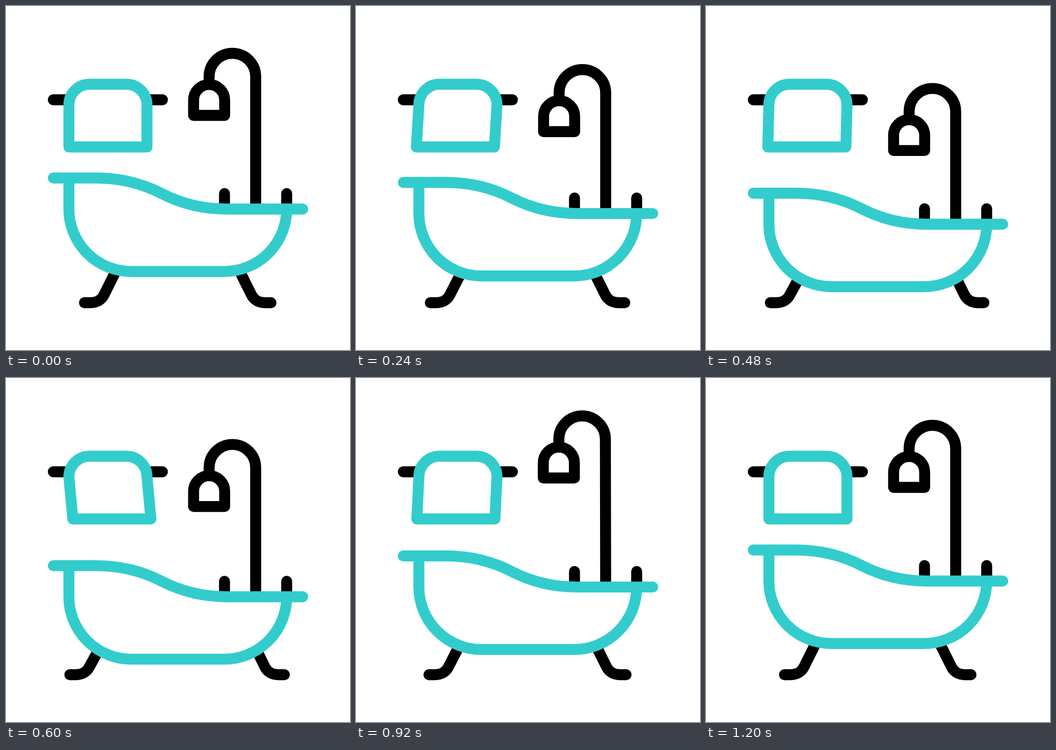
Write an HTML page with a canvas that moves like this. It is 640 px wide and 640 px high and loops after 1320 ms.

```html
<!DOCTYPE html>
<html lang="en">
<head>
<meta charset="utf-8">
<title>Bathtub</title>
<style>
  html, body { margin: 0; width: 100%; height: 100%; overflow: hidden; background: #fff; }
  canvas { display: block; width: 100vw; height: 100vh; }
</style>
</head>
<body>
<canvas id="stage" width="640" height="640"></canvas>
<script>
const ctx = document.getElementById('stage').getContext('2d');
const LOOP = 1320, STEP = 40;
const TEAL = '#33cccc', BLACK = '#000';

// [time in ms, value]
const TUB = [[40, 0], [560, 29.3], [1200, 0]];
const SHOWER = [[71, 0], [428, 67.6], [828, -20.5], [1144, 0]];
const TOWEL = [[84, 0], [360, -7.6], [640, 7.8], [988, -4.6], [1200, 0]];

// cubic-bezier(.5, 0, .5, 1)
function ease(x) {
  let lo = 0, hi = 1;
  for (let i = 0; i < 24; i++) {
    const u = (lo + hi) / 2;
    if (1.5 * u * (1 - u) + u * u * u < x) lo = u; else hi = u;
  }
  return lo * lo * (3 - 2 * lo);
}

function track(keys, t) {
  if (t <= keys[0][0]) return keys[0][1];
  for (let i = 1; i < keys.length; i++) {
    const [t0, a] = keys[i - 1], [t1, b] = keys[i];
    if (t < t1) return a + (b - a) * ease((t - t0) / (t1 - t0));
  }
  return keys[keys.length - 1][1];
}

function stroke(color, cap, build, fill) {
  ctx.beginPath();
  build(ctx);
  if (fill) {
    ctx.fillStyle = fill;
    ctx.fill();
  }
  ctx.strokeStyle = color;
  ctx.lineCap = cap;
  ctx.stroke();
}

function line(color, x0, y0, x1, y1) {
  stroke(color, 'round', c => { c.moveTo(x0, y0); c.lineTo(x1, y1); });
}

// side: 1 for left, -1 for right
function leg(side, foot, hip, drop) {
  const X = x => side > 0 ? x : 639 - x;
  stroke(BLACK, 'butt', c => {
    c.moveTo(X(146 - foot), 552);
    c.lineTo(X(157.5 - foot), 552);
    c.bezierCurveTo(X(168.5 - foot), 552, X(177.6 - foot), 546.8, X(182.3 - foot), 537.5);
    c.lineTo(X(205.5 - hip), 491 + drop);
  });
  line(BLACK, X(146 - foot), 552, X(147 - foot), 552);
}

function drawTowel(s) {
  line(BLACK, 88, 174.5, 291, 174.5);
  stroke(TEAL, 'round', c => {
    c.moveTo(117 + s, 262.2);
    c.lineTo(117, 184);
    c.arc(155.5, 184, 38.5, Math.PI, Math.PI * 1.5);
    c.arc(223.8, 184, 38.5, Math.PI * 1.5, Math.PI * 2);
    c.lineTo(262.3 + s, 262.2);
    c.closePath();
  }, '#fff');
}

function drawShower(dy, base) {
  const dx = Math.min(0, dy) * 0.03;
  stroke(BLACK, 'butt', c => {
    c.moveTo(464.5, base);
    c.lineTo(464.5 + dx, 131.3 + dy);
    c.arc(421.2 + dx, 131.3 + dy, 43.3, 0, Math.PI, true);
    c.lineTo(377.9 + dx, 146 + dy);
  });
  stroke(BLACK, 'round', c => {
    c.moveTo(349 + dx, 203.5 + dy);
    c.lineTo(349 + dx, 175 + dy);
    c.arc(377.9 + dx, 175 + dy, 28.9, Math.PI, Math.PI * 2);
    c.lineTo(406.8 + dx, 203.5 + dy);
    c.closePath();
  });
}

function drawTub(dy) {
  const top = 320 + dy, rim = 377.8 + dy;
  for (const x of [406.5, 522.2]) line(BLACK, x, 349 + dy, x, rim - 6);
  stroke(TEAL, 'round', c => {
    c.moveTo(117, top);
    c.lineTo(117, rim);
    c.arc(233.2, rim, 116.2, Math.PI, Math.PI / 2, true);
    c.arc(406, rim, 116.2, Math.PI / 2, 0, true);
  });
  stroke(TEAL, 'round', c => {
    c.moveTo(88, top);
    c.lineTo(168, top);
    c.bezierCurveTo(210, top, 252.2, top + 9.7, 289.5, top + 28.9);
    c.bezierCurveTo(326.8, top + 48.1, 369, rim, 411, rim);
    c.lineTo(552, rim);
  });
}

function render(t) {
  const dy = track(TUB, t), p = dy / 29;
  ctx.fillStyle = '#fff';
  ctx.fillRect(0, 0, 640, 640);
  ctx.lineWidth = 20.4;
  ctx.lineJoin = 'round';
  drawTowel(track(TOWEL, t));
  drawShower(track(SHOWER, t), 377.8 + dy);
  leg(1, 27.1 * p, 33 * p, 15 * p);
  leg(-1, 24.8 * p, 32.5 * p, 15 * p);
  drawTub(dy);
}

const start = performance.now();
function tick() {
  const t = (performance.now() - start) % LOOP;
  render(Math.floor(t / STEP) * STEP);
  requestAnimationFrame(tick);
}
tick();
</script>
</body>
</html>
```
